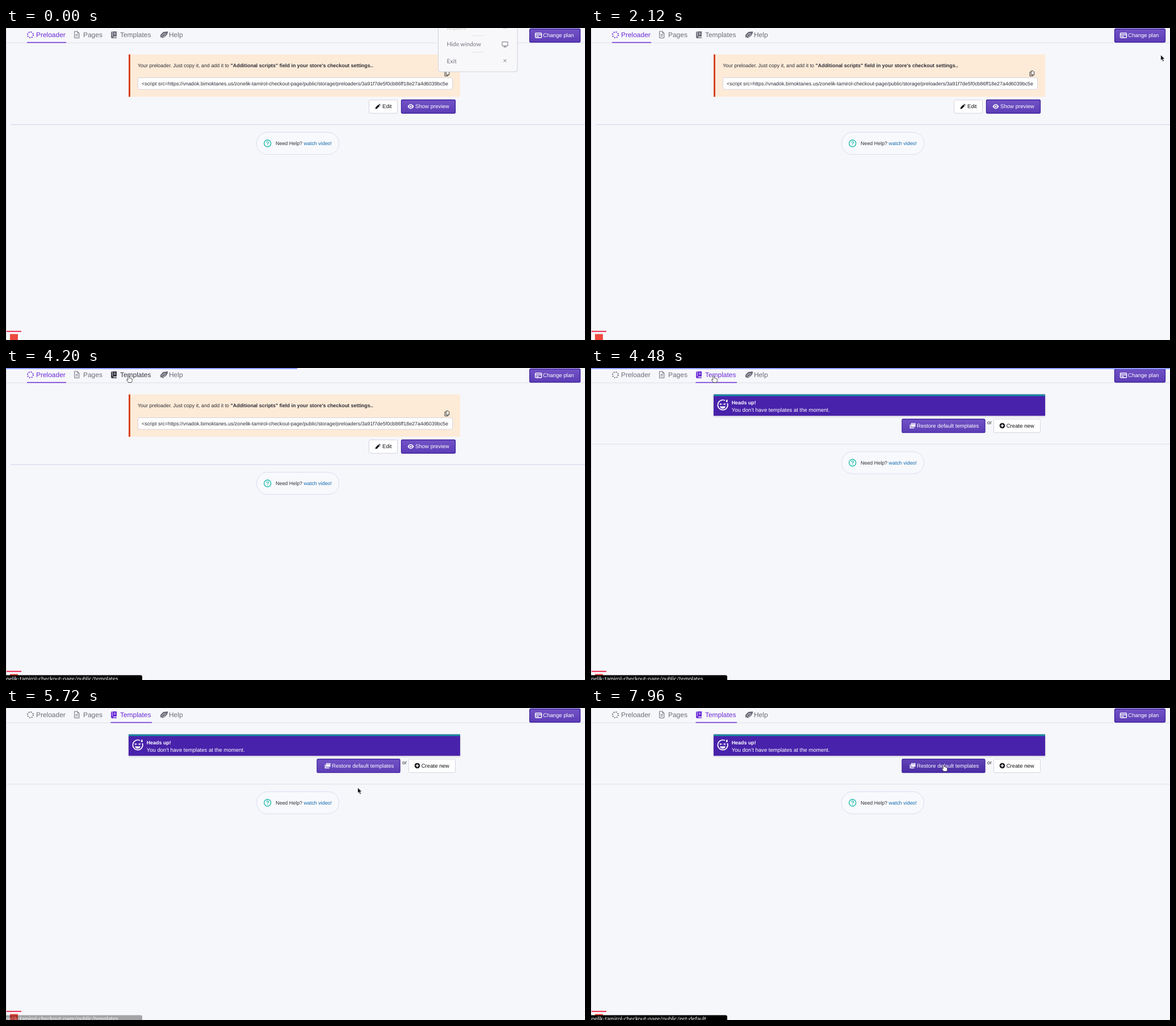
An HTML page that plays this animation: 1020x549 px, repeating every 8000 ms.

```html
<!DOCTYPE html>
<html lang="en">
<head>
<meta charset="utf-8">
<title>Preloader settings</title>
<style>
html, body { margin: 0; width: 100%; height: 100%; overflow: hidden; background: #f6f7fa; }
svg { display: block; width: 1020px; height: 549px; }
text { font: 8.92px "Liberation Sans", Arial, sans-serif; fill: #2d2d36; text-rendering: geometricPrecision; white-space: pre; }
.nav text { font-size: 11.95px; fill: currentColor; }
.nav g { color: #6c6c78; }
.nav g.hover { color: #363640; }
.nav g.on { color: #6a2bd8; }
.btn { font-size: 9.6px; fill: #15151b; }
.light { fill: #fff; }
.bold { font-weight: bold; }
.link { fill: #1068ad; }
.ui { font: 10.4px Lato, "Open Sans", sans-serif; fill: #74747e; }
.tip { font: 9.8px Lato, "Open Sans", sans-serif; fill: #fff; text-anchor: end; }
.line { fill: none; stroke: currentColor; }
</style>
</head>
<body>
<svg viewBox="0 0 1020 549">
  <defs>
    <linearGradient id="violet" x2="0" y2="1"><stop stop-color="#7253c6"/><stop offset="1" stop-color="#5d3db6"/></linearGradient>
    <linearGradient id="violetDark" x2="0" y2="1"><stop stop-color="#6244b8"/><stop offset="1" stop-color="#4a2ba4"/></linearGradient>
    <filter id="soft" x="-5%" y="-20%" width="110%" height="150%"><feDropShadow dx="0" dy="1" stdDeviation="1.5" flood-color="#28204a" flood-opacity=".3"/></filter>
    <clipPath id="field"><rect x="233" y="88" width="547" height="19"/></clipPath>
  </defs>

  <rect width="1020" height="549" fill="#f6f7fa"/>
  <path d="M.5 0V549" stroke="#d9d9e2"/>
  <path d="M1 26H1020" stroke="#dedee7"/>

  <g class="nav">
    <g id="navPre">
      <circle class="line" cx="43" cy="12" r="5" stroke-width="2" stroke-dasharray="1.9 2.027"/>
      <text x="53" y="16">Preloader</text>
      <path class="mark" d="M37 25.5H106" stroke="currentColor" stroke-width="1.6"/>
    </g>
    <g>
      <path class="line" d="M120.7 6H126L128.8 9V17.5H120.7ZM126 6V9H128.8M122.5 11.5H127M122.5 14H127"/>
      <text x="136" y="16">Pages</text>
    </g>
    <g id="navTpl">
      <path d="M187 6H195V15H189V16.5H195V18H187Q185 18 185 16V8Q185 6 187 6Z" fill="currentColor"/>
      <path d="M187.3 6V14.5M190 9H193M190 11H193" stroke="#f6f7fa" stroke-width=".8"/>
      <text x="201" y="16">Templates</text>
      <path class="mark" d="M184.500 25.500H257" stroke="currentColor" stroke-width="1.600"/>
    </g>
    <g>
      <path d="M272 12L277 7L285 6V9L282 14L276 18L274 16L272 17Z" fill="currentColor"/>
      <path d="M274 14L278 10L282 11M276 16L281 13" class="line" style="stroke:#f6f7fa" stroke-width=".8"/>
      <text x="287" y="16">Help</text>
    </g>
  </g>

  <rect x="922.500" y="1.500" width="89" height="23.500" rx="2" fill="url(#violet)" stroke="#3c20a0" stroke-width="1.300"/>
  <path d="M933.500 9H942.500Q943.500 9 943.500 10V16Q943.500 17 942.500 17H933.500Q932.500 17 932.500 16V10Q932.500 9 933.500 9ZM932.500 12H943.500M934.500 14.800H938.500" fill="none" stroke="#fff" stroke-width="1.400"/>
  <text class="btn light" x="946" y="16.300">Change plan</text>

  <g id="prePage">
    <rect x="216" y="46.500" width="584" height="74.500" fill="#fdebd8"/>
    <rect x="216" y="46.500" width="3" height="74.500" fill="#d8421c"/>
    <text x="232" y="69">Your preloader. Just copy it, and add it to <tspan class="bold">"Additional scripts" field in your store's checkout settings..</tspan></text>
    <rect x="232.500" y="87.500" width="554" height="20.500" rx="2.500" fill="#fff" stroke="#d6d3e0"/>
    <text x="239" y="101" clip-path="url(#field)">&lt;script src=https://vnadok.bimoktanes.us/zonelik-tamirol-checkout-page/public/storage/preloaders/3a91f7de5f0cb86ff18e27a4d6039bc5e</text>
    <rect x="639.500" y="126.500" width="50" height="23.500" rx="2" fill="#fff" stroke="#d2d2e0"/>
    <path d="M650.500 142.500L651.200 139.500L656 134.700L658.400 137L653.500 141.900ZM656.700 134L657.500 133.300L659.800 135.600L659 136.400Z" fill="#15151b"/>
    <text class="btn" x="663" y="141.300">Edit</text>
    <rect x="696.500" y="126.500" width="95" height="23.500" rx="2" fill="url(#violet)" stroke="#3c20a0" stroke-width="1.300"/>
    <path d="M707.500 138.200Q713 130 718.500 138.200Q713 146.400 707.500 138.200Z" fill="#fff"/>
    <circle cx="713" cy="138.200" r="2.100" fill="#fff" stroke="#6545bc" stroke-width="1.100"/>
    <text class="btn light" x="721" y="141.300">Show preview</text>
    <path d="M8 170H1020" stroke="#d1cced"/>
  </g>

  <g id="tplPage">
    <rect x="216" y="46.500" width="584" height="37.500" fill="#4822ab" filter="url(#soft)"/>
    <rect x="216" y="46.500" width="584" height="2.800" fill="#16919f"/>
    <g fill="none" stroke="#fff" stroke-width="1.700">
      <path d="M236 57.200A8.700 8.700 0 1 0 240.300 62"/>
      <path d="M226.700 62.500L229.800 63.500L227 64.800M237 62.500L233.800 63.500L236.700 64.800" stroke-width="1.200"/>
      <path d="M227 67.500H237Q236 71.500 232 71.500T227 67.500Z" fill="#fff" stroke="none"/>
      <path d="M239.300 55Q242.500 59.500 239.300 60T239.300 55Z" fill="#fff" stroke="none"/>
    </g>
    <text class="light bold" x="247.700" y="64">Heads up!</text>
    <text class="light" x="247.700" y="76.500" style="font-size:9.56px">You don't have templates at the moment.</text>
    <rect id="restore" x="548" y="90" width="146" height="23.700" rx="2" stroke="#3c20a0" stroke-width="1.300"/>
    <path d="M564 97H571.500V103.500H564Z" fill="#fff"/>
    <path d="M562.500 99.500V105.500H569.500" fill="none" stroke="#fff" stroke-width="1.600"/>
    <path d="M565 98.700H570.500" stroke="#6545bc" stroke-width=".8"/>
    <text class="btn light" x="574" y="104.800">Restore default templates</text>
    <text x="698" y="98.700">or</text>
    <rect x="709.500" y="90" width="82" height="23.700" rx="2" fill="#fff" stroke="#d6d6e2"/>
    <circle cx="724.500" cy="101.500" r="4.800" fill="#15151b"/>
    <path d="M721.800 101.500H727.200M724.500 98.800V104.200" stroke="#fff" stroke-width="1.500"/>
    <text class="btn" x="731.700" y="104.800">Create new</text>
    <path d="M1 134H1020" stroke="#dcdee6"/>
  </g>

  <g id="helpPill">
    <rect x="441.500" y="183.500" width="145" height="39" rx="19.500" fill="#f8f9fc" stroke="#d9dcf0"/>
    <circle cx="460.700" cy="203" r="6" fill="none" stroke="#1fbcae" stroke-width="1.400"/>
    <path d="M458.800 201.700Q458.800 200 460.700 200T462.600 201.600Q462.600 202.500 460.700 203.500V204.300M460.700 205.400V206.600" fill="none" stroke="#1fbcae" stroke-width="1.200"/>
    <text x="475" y="206.200">Need Help? <tspan class="link">watch video!</tspan></text>
  </g>

  <g id="copy" fill="#f9f0e6" stroke="#3c3835" stroke-width="1">
    <path d="M774.500 77.500H773V84.500H778.500V83"/>
    <path d="M775.300 75.500H779L780.700 77.200V82.500H775.300Z"/>
  </g>

  <g id="menu">
    <rect x="761.500" y="-8" width="139.500" height="85" rx="4" fill="#f8f8fb" stroke="#cfd0d9"/>
    <path d="M820 13.500H842M820 42.500H842" stroke="#e2e2e8"/>
    <text class="ui" x="776.500" y="2.500" style="fill:#c3c3bd">Repaint</text>
    <text class="ui" x="776.500" y="32">Hide window</text>
    <text class="ui" x="776.500" y="61.500">Exit</text>
    <g fill="none" stroke="#74747e">
      <path d="M874 24.500H884V31.500H874ZM879 31.500V33.500M876.500 33.500H881.500"/>
      <path d="M876.500 55L881.500 60M881.500 55L876.500 60"/>
      <path d="M875 .5H883" stroke="#c8c8cc"/>
    </g>
  </g>

  <rect x="1" y="534" width="26" height="15" fill="#f9f9fb"/>
  <rect x="1" y="532.800" width="26" height="2.200" fill="#ef3b5e"/>
  <rect x="7" y="538.500" width="14" height="14" fill="#ee4a3f"/>

  <g id="bubble">
    <rect id="bubbleBox" x="-5" y="540.500" height="20" rx="3"/>
    <text id="bubbleText" class="tip" y="550"></text>
  </g>

  <rect id="bar" height="2" fill="#8f9cff"/>

  <g id="cursor" stroke="#fff" stroke-width=".8" stroke-linejoin="round">
    <path id="arrow" d="M0 0V10L2.300 8L4 12L6 11.100L4.300 7.300H7.500Z" fill="#15151b"/>
    <path id="hand" d="M-1.200 .8Q0-.8 1.200 .8V4.300Q2.300 3.700 3 4.700Q4.200 4.300 4.600 5.300Q6 5 6.200 6.400V9Q6 11 5 12H-.5Q-1.500 10-3.600 7.500Q-3.600 6-1.200 7.300Z" fill="#fff" stroke="#26262c"/>
  </g>
</svg>
<script>
const LOOP = 8000;
const el = id => document.getElementById(id);
const clamp = v => Math.max(0, Math.min(1, v));
const ramp = (t, a, b) => clamp((t - a) / (b - a));
const ease = v => v * v * (3 - 2 * v);
const mix = (a, b, k) => a + (b - a) * k;
const show = (id, on) => { el(id).style.display = on ? '' : 'none'; };
const fade = (id, v) => { el(id).style.opacity = v; };
const set = (id, name, value) => el(id).setAttribute(name, value);

// time, x, y of the pointer tip
const path = [
  [2120, 1004, 47], [2480, 850, 112], [2920, 450, 88], [3220, 216, 13.5],
  [5160, 216, 13.5], [5680, 619.5, 140], [5960, 619.5, 140], [6300, 621.5, 99.5]
];

function pointer(t) {
  let i = 0;
  while (i < path.length - 2 && t >= path[i + 1][0]) i++;
  const [t0, x0, y0] = path[i], [t1, x1, y1] = path[i + 1];
  const k = ramp(t, t0, t1), e = i > 2 ? ease(k) : k;
  return [mix(x0, x1, e), mix(y0, y1, e)];
}

function draw(t) {
  const templates = t >= 4320;
  const [x, y] = pointer(t);
  const overNav = x > 184 && x < 258 && y < 26;
  const overRestore = templates && x > 548 && x < 694 && y > 90 && y < 114;

  fade('menu', 1 - ramp(t, 40, 440));

  show('prePage', !templates);
  show('copy', !templates);
  show('tplPage', templates);
  set('helpPill', 'transform', `translate(0 ${templates ? -36.3 : 0})`);
  set('navPre', 'class', templates ? '' : 'on');
  set('navTpl', 'class', templates ? 'on' : t >= 2120 && overNav ? 'hover' : '');
  document.querySelector('#navPre .mark').style.display = templates ? 'none' : '';
  document.querySelector('#navTpl .mark').style.display = templates ? '' : 'none';
  set('restore', 'fill', overRestore ? 'url(#violetDark)' : 'url(#violet)');

  show('cursor', t >= 2120);
  set('cursor', 'transform', `translate(${x} ${y})`);
  const pointing = overNav || overRestore;
  show('hand', pointing);
  show('arrow', !pointing);

  set('bar', 'width', 1020 * ease(ramp(t, 3960, 4440)));
  fade('bar', 1 - ramp(t, 4480, 4740));

  const second = t >= 6000;
  const width = second ? mix(207, 240, ramp(t, 7840, 7960)) : mix(201.5, 240, ramp(t, 3560, 3680));
  set('bubbleBox', 'width', width + 5);
  set('bubbleText', 'x', second ? 203 : 197.5);
  el('bubbleText').textContent = 'zonelik-tamirol-checkout-page/public/' + (second ? 'get-default' : 'templates');
  fade('bubble', second ? ramp(t, 6320, 6600) : ramp(t, 3200, 3440) * (1 - ramp(t, 5560, 5800)));
}

const start = performance.now();
function tick() {
  draw((performance.now() - start) % LOOP);
  requestAnimationFrame(tick);
}
tick();
</script>
</body>
</html>
```
